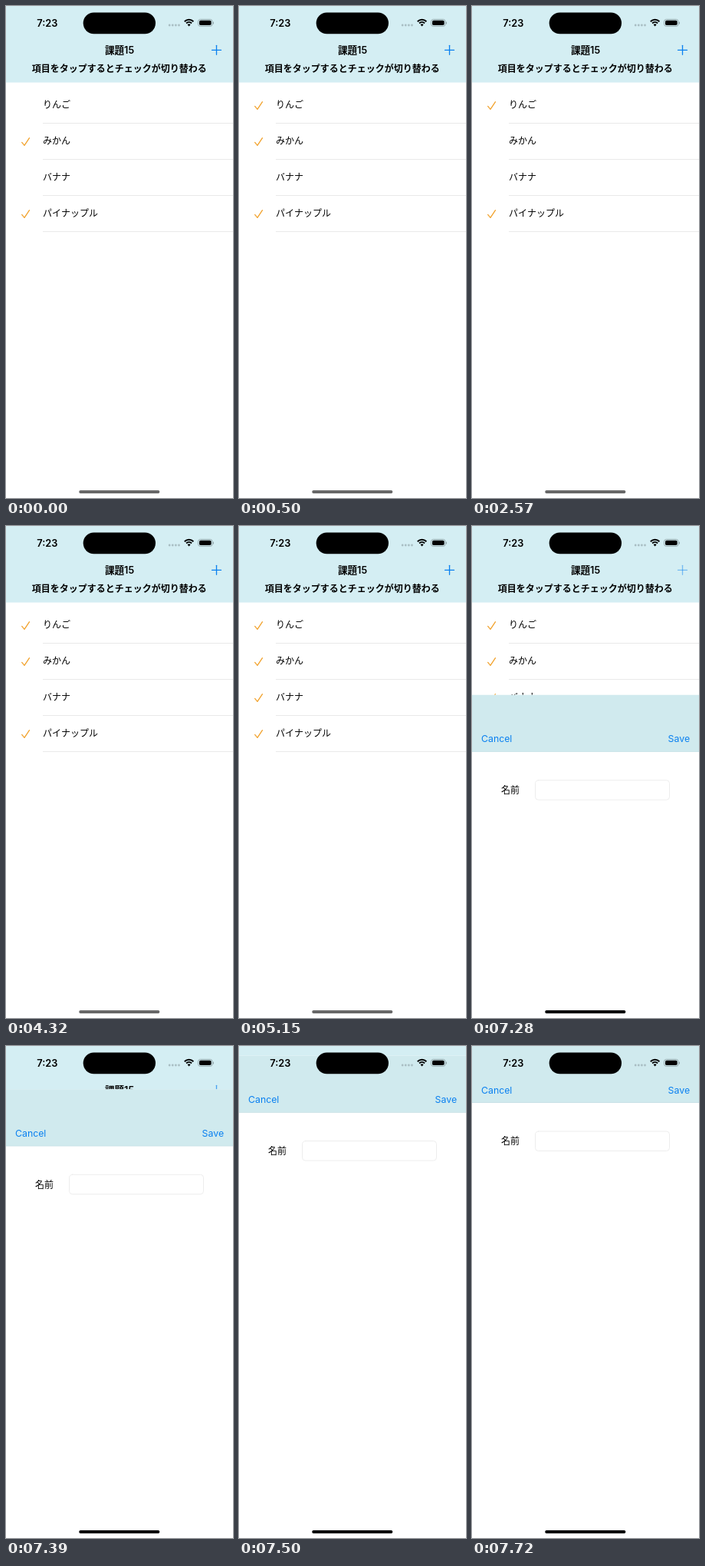
Write an HTML page with a canvas that moves like this. It is 296x640 px and loops after 8000 ms.

```html
<!DOCTYPE html>
<html lang="ja">
<head>
<meta charset="utf-8">
<title>課題15</title>
<style>
html, body { margin: 0; width: 100%; height: 100%; overflow: hidden; background: #fff; }
canvas { display: block; width: 296px; height: 640px; }
</style>
</head>
<body>
<canvas id="stage"></canvas>
<script>
const W = 296, H = 640, LOOP = 8000;
const canvas = document.getElementById('stage');
const ctx = canvas.getContext('2d');
const dpr = window.devicePixelRatio || 1;
canvas.width = W * dpr;
canvas.height = H * dpr;

const FONT = 'Inter, "Noto Sans CJK JP", "Noto Sans CJK", sans-serif';
const BLUE = '#0a80f0', ORANGE = '#f2a22c', BAR = '#d4eef3', SHEET_BAR = '#d0eaee';
const TAP = 7060, STEP = 110, RISE = 7143;

// Each row lists the times at which its check flips.
const rows = [
  { name: 'りんご', on: false, flips: [500] },
  { name: 'みかん', on: true, flips: [2570, 4320] },
  { name: 'バナナ', on: false, flips: [5150] },
  { name: 'パイナップル', on: true, flips: [] }
];

function text(str, x, y, size, { weight = 400, color = '#000', align = 'left' } = {}) {
  ctx.font = `${weight} ${size}px ${FONT}`;
  ctx.fillStyle = color;
  ctx.textAlign = align;
  ctx.fillText(str, x, y + size * 0.37);
}

function rect(x, y, w, h, color) {
  ctx.fillStyle = color;
  ctx.fillRect(x, y, w, h);
}

function pill(x, y, w, h, r, color) {
  ctx.beginPath();
  ctx.roundRect(x, y, w, h, r);
  ctx.fillStyle = color;
  ctx.fill();
}

function line(points, color, width) {
  ctx.beginPath();
  points.forEach(([x, y]) => ctx.lineTo(x, y));
  ctx.strokeStyle = color;
  ctx.lineWidth = width;
  ctx.lineCap = ctx.lineJoin = 'round';
  ctx.stroke();
}

function drawPlus(alpha) {
  ctx.globalAlpha = alpha;
  line([[268.5, 57.3], [280.5, 57.3]], BLUE, 1.3);
  line([[274.5, 51.3], [274.5, 63.3]], BLUE, 1.3);
  ctx.globalAlpha = 1;
}

function drawList(t, plusAlpha) {
  rect(0, 0, W, 99.5, BAR);
  text('課題15', 148, 57.2, 12.6, { weight: 600, align: 'center' });
  text('項目をタップするとチェックが切り替わる', 147.7, 81.2, 12, { weight: 600, align: 'center' });
  drawPlus(plusAlpha);
  rows.forEach((row, i) => {
    const y = 129 + i * 47;
    const flipped = row.flips.filter(f => t >= f).length % 2 === 1;
    if (row.on !== flipped) {
      line([[20.7, y + 1.4], [24, y + 5.3], [30.5, y - 4.3]], ORANGE, 1.3);
    }
    text(row.name, 48, y, 12);
    rect(48, y + 23, W - 48, 1, '#e9e9e9');
  });
}

function drawSheet(top) {
  rect(0, top, W, H, '#fff');
  rect(0, top, W, 74, SHEET_BAR);
  rect(0, top + 73.4, W, 0.6, '#c3dde2');
  text('Cancel', 12, top + 57.2, 12.3, { color: BLUE });
  text('Save', 255.6, top + 57.2, 12.3, { color: BLUE });
  text('名前', 38, top + 124, 12);
  ctx.beginPath();
  ctx.roundRect(82.5, top + 111, 175, 25.5, 4);
  ctx.strokeStyle = '#ebebeb';
  ctx.lineWidth = 0.9;
  ctx.stroke();
}

function drawStatus() {
  text('7:23', 40.3, 22, 12.8, { weight: 600 });
  pill(100.7, 8.5, 94.3, 27.7, 13.85, '#000');
  for (let i = 0; i < 4; i++) pill(211.8 + i * 4.1, 23.6, 2.8, 2.8, 1.4, '#a9bec3');

  // Wi-Fi fan
  ctx.strokeStyle = '#000';
  ctx.lineCap = 'butt';
  ctx.lineWidth = 2;
  for (const r of [8.2, 4.9]) {
    ctx.beginPath();
    ctx.arc(238.6, 26, r, -Math.PI * 0.75, -Math.PI * 0.25);
    ctx.stroke();
  }
  ctx.beginPath();
  ctx.moveTo(238.6, 26.6);
  ctx.arc(238.6, 26.2, 2.8, -Math.PI * 0.75, -Math.PI * 0.25);
  ctx.fillStyle = '#000';
  ctx.fill();

  // Battery
  ctx.beginPath();
  ctx.roundRect(250.6, 17.4, 18.4, 9, 2.8);
  ctx.strokeStyle = '#8a9b9f';
  ctx.lineWidth = 0.8;
  ctx.stroke();
  pill(252, 18.8, 15.6, 6.2, 1.7, '#000');
  pill(269.8, 20.5, 1, 2.9, 0.5, '#8a9b9f');
}

// Critically damped spring from the bottom edge to the top.
function sheetTop(t) {
  const s = Math.max(0, t - RISE) * 0.0164;
  const top = H * (1 + s) * Math.exp(-s);
  return top < 1 ? 0 : top;
}

function draw(now) {
  let t = now % LOOP;
  // The presentation advances in even ticks.
  if (t >= TAP) t = TAP + Math.floor((t - TAP) / STEP) * STEP;
  const rising = t > RISE;
  const plusAlpha = t < TAP ? 1 : Math.min(1, 0.2 + Math.max(0, t - RISE) * 0.002);

  ctx.setTransform(dpr, 0, 0, dpr, 0, 0);
  rect(0, 0, W, H, '#fff');
  drawList(t, plusAlpha);
  if (rising) drawSheet(sheetTop(t));
  drawStatus();
  pill(95.2, 630, 105.2, 4, 2, rising ? '#000' : '#686868');
}

const start = performance.now();
function frame() {
  draw(performance.now() - start);
  requestAnimationFrame(frame);
}
frame();
</script>
</body>
</html>
```
